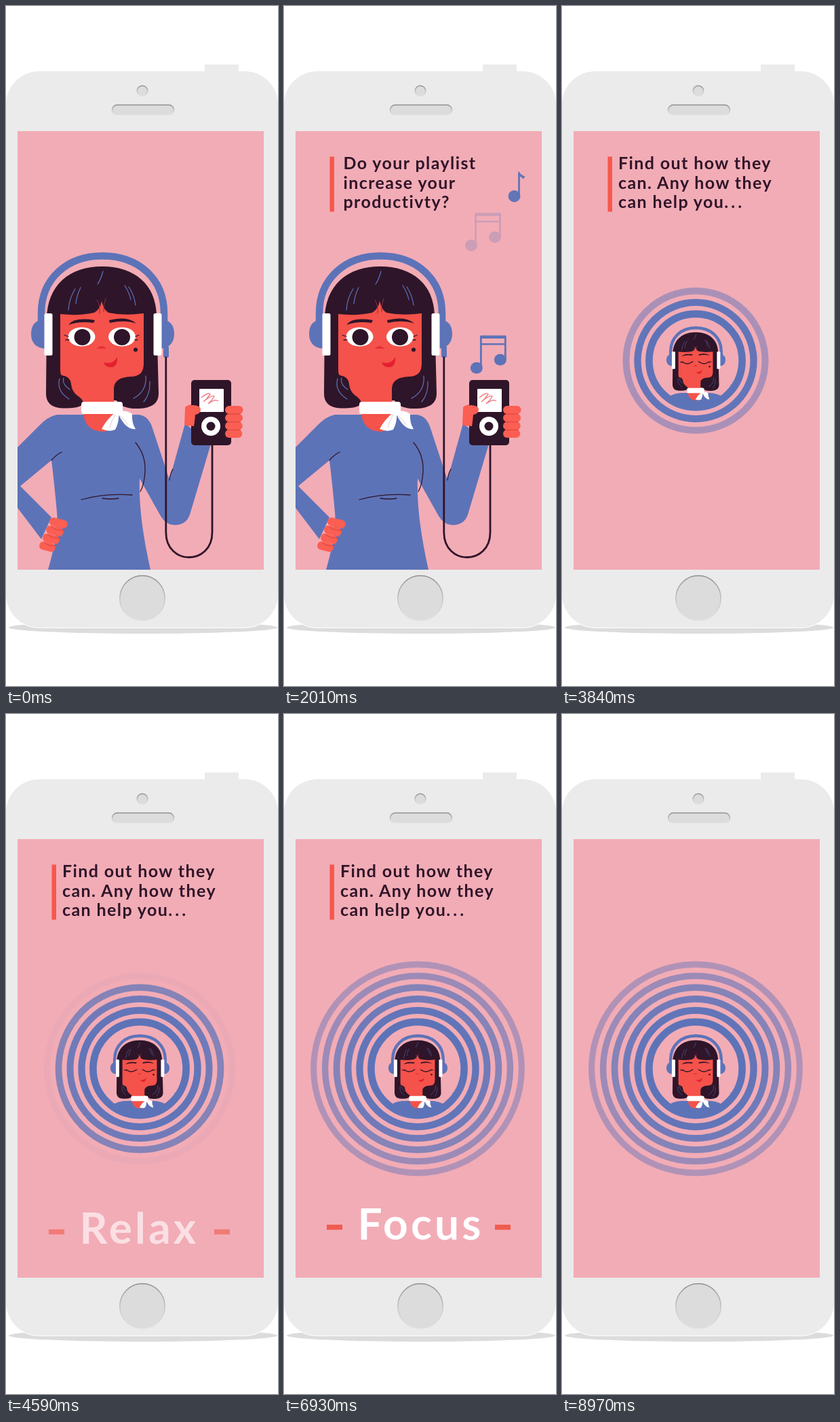
Write an HTML page that moves like this. It is 401 px wide and 1000 px high and loops after 9 s.

```html
<!DOCTYPE html>
<html lang="en">
<head>
<meta charset="utf-8">
<title>Playlist</title>
<style>
html, body { margin: 0; width: 100%; height: 100%; overflow: hidden; background: #fff; }
svg { display: block; width: 100%; height: 100%; }
text { font-family: Lato, "Open Sans", sans-serif; font-weight: 700; }
.copy { font-size: 25px; letter-spacing: 1.4px; fill: #2f1529; }
.dots { letter-spacing: 4px; }
.word { font-size: 64px; letter-spacing: 4.2px; fill: #fff; }
.blue { fill: #5d73b8; }
.dark { fill: #2f1529; }
.skin { fill: #f4524a; }
.hand { fill: #fb5e53; }
.white { fill: #fff; }
.line { fill: none; stroke: #2f1529; stroke-linecap: round; }
.strand { fill: none; stroke: #5d73b8; stroke-width: 1.2; stroke-linecap: round; }
.band { fill: none; stroke: #5d73b8; }
</style>
</head>
<body>
<svg id="stage" viewBox="0 0 401 1000"></svg>
<script>
const LOOP = 9000;
const stage = document.getElementById('stage');

const clamp = v => Math.max(0, Math.min(1, v));
const ramp = (t, a, b) => clamp((t - a) / (b - a));
const easeOut = p => 1 - (1 - p) ** 3;
const easeInOut = p => p < .5 ? 2 * p * p : 1 - 2 * (1 - p) ** 2;

const path = (d, cls, extra = '') => `<path d="${d}" class="${cls}" ${extra}/>`;
const line = (d, w = 1.3) => path(d, 'line', `stroke-width="${w}"`);
const box = (x, y, w, h, r, cls) =>
  `<rect x="${x}" y="${y}" width="${w}" height="${h}" rx="${r}" class="${cls}"/>`;
const dot = (x, y, r, cls, ry = r) =>
  `<ellipse cx="${x}" cy="${y}" rx="${r}" ry="${ry}" class="${cls}"/>`;
const copy = (id, x, lines) => `<g id="${id}"><text class="copy">` +
  lines.map((s, i) => `<tspan x="${x}" y="${240 + i * 28.6}">${s}</tspan>`).join('') + '</text></g>';

const defs = `<defs>
  <filter id="rough" x="-5%" y="-5%" width="110%" height="110%" color-interpolation-filters="sRGB">
    <feTurbulence type="fractalNoise" baseFrequency=".25" numOctaves="2" seed="4"/>
    <feDisplacementMap in="SourceGraphic" scale="1.4" xChannelSelector="R" yChannelSelector="G"/>
  </filter>
  <linearGradient id="rim" x1="0" y1="0" x2="0" y2="1">
    <stop offset="0" stop-color="#8f8f8f"/><stop offset=".55" stop-color="#c9c9c9"/>
    <stop offset="1" stop-color="#e6e6e6"/>
  </linearGradient>
  <clipPath id="screen"><rect x="17" y="184" width="363" height="645"/></clipPath>
  <clipPath id="disc"><circle cx="197" cy="521.5" r="66"/></clipPath>
</defs>`;

const phone = `
  <ellipse cx="202" cy="914" rx="198" ry="9" fill="#dcdcdc"/>
  <rect x="0" y="97" width="401" height="818" rx="49" fill="#fff"/>
  <rect x="293" y="86" width="50" height="20" fill="#ebebeb"/>
  <rect x="0" y="96" width="401" height="818" rx="49" fill="#ebebeb"/>
  <g fill="#dcdcdc" stroke="url(#rim)" stroke-width="1.6">
    <circle cx="201" cy="125" r="7.8"/>
    <rect x="156.5" y="145.5" width="91" height="15" rx="7.5"/>
    <circle cx="201" cy="871" r="33.2"/>
  </g>
  <rect x="17" y="184" width="363" height="645" fill="#f2acb6"/>`;

const openEyes =
  dot(111.5, 486.5, 20, 'white', 14) + dot(171, 486.5, 20, 'white', 14) +
  dot(112.5, 487, 12, 'dark') + dot(171, 487, 12, 'dark') +
  line('M92 486L86 484M93 491L88 491M191 486L196 484M190 491L194 491');

const closedEyes =
  line('M93 488Q111 502 131 488M152 488Q171 502 190 488', 3.4) +
  line('M94 491L86 489M190 491L197 488', 2.4);

const head = eyes => `
  <g filter="url(#rough)">
    ${path('M52 470V452C52 401 90 367.5 142 367.5C195 367.5 233 401 233 452V470', 'band', 'stroke-width="10.5"')}
    ${path('M58 460Q37 462 37 482Q37 502 58 504Z', 'blue')}
    ${path('M227 460Q248 462 248 482Q248 502 227 504Z', 'blue')}
    ${path(`M142 383C94 383 60 410 60 462L59 570Q59 588 78 591Q113 594 117 580H163Q170 593 196 592
      Q225 591 225 570L222 455C221 410 190 383 142 383Z`, 'dark')}
  </g>
  ${path(`M80 453Q108 456 130 451Q139 446 141 434Q144 447 151 451Q174 456 203 452V526Q203 545 184 545
    Q160 546 159 562V590H114Q117 580 104 572Q97 566 96 556Q95 545 82 543Q80 542 80 534Z`, 'skin')}
  ${path('M114 598Q116 625 143 626Q160 624 162 598Z', 'skin')}
  ${eyes}
  ${path('M92 469Q100 457 131 462L129 466Q108 463 92 469ZM152 462Q180 455 192 467Q176 461 153 466Z', 'dark')}
  ${path('M134 504Q141 496 148 504Z', '', 'fill="#e8303a"')}
  ${path('M144 524Q158 528 164 516Q165 533 152 531Q146 530 144 524Z', '', 'fill="#e5202f"')}
  ${dot(191, 505.5, 3, 'dark')}
  ${path(`M102 416Q93 430 92 447M110 414Q104 426 103 438M181 413Q189 425 191 440M175 411Q182 422 184 432
    M135 409Q140 402 143 390M79 548Q74 566 93 578M85 547Q82 556 94 564M206 544Q208 566 188 577
    M212 552Q213 570 203 582`, 'strand')}
  ${path('M134 432Q139 440 138 452M147 430Q143 440 144 450', '', 'fill="none" stroke="#8c2f3c"')}
  <g filter="url(#rough)">${box(56.5, 452, 12, 62, 2.5, 'white')}${box(217.5, 452, 12, 62, 2.5, 'white')}</g>`;

const scarf =
  box(111, 582, 61, 18, 4, 'white') +
  path('M163 596Q148 608 141 622Q152 627 161 623Q167 612 166 600Z', 'white') +
  path('M160 598Q176 592 186 600Q185 613 191 622Q178 624 167 603Z', 'white') +
  path('M161 601Q155 610 153 620M167 602Q176 608 180 616', '', 'fill="none" stroke="#e6c9d2"');

const fingers = [0, 1, 2, 3].map(i =>
  `<g transform="rotate(14 ${77 - i * 5} ${760 + i * 11.7})">${box(64 - i * 5, 754 + i * 11.7, 27 - i, 12.4, 6, 'hand')}</g>` +
  box(323, 588 + i * 11.7, 26.5 - i * .4, 12, 6, 'hand')).join('') +
  path('M67 766Q74 772 87 771M61 777Q69 784 82 782M56 789Q63 795 77 794M326 600H346M326 611.7H346M326 623.4H346',
    '', 'fill="none" stroke="#d8433f"');

const body =
  path(`M75 601H195Q210 602 216 621L241 697L264 614L302 644L271 748Q265 765 246 763Q235 762 228 750L197 695
    Q195 750 213 829H62Q78 774 75 744Q71 700 67 668L21 706L67 752L52 784L17 738V649L47 619Q62 603 75 601Z`, 'blue') +
  line('M67 668Q74 660 82 656M191 642Q206 660 205 684Q204 704 198 714M111 726Q145 716 186 719M142 724Q155 726 166 724M241 697Q242 688 246 681');

const player =
  path('M264 590Q272 583 284 588V618L264 617Z', 'hand') +
  box(273, 550, 59, 96, 5, 'dark') +
  box(285, 563, 36, 34, 1, 'white') +
  path('M288 576Q299 567 301 571Q296 578 291 582Q304 571 307 574Q304 580 298 585Q308 577 313 581', '',
    'fill="none" stroke="#f2808a" stroke-width="1.5"') +
  dot(302, 618, 14, 'white') + dot(302, 618, 6.5, 'dark') +
  path('M264 592Q266 587 276 587Q288 588 287 594Q286 600 279 601Q278 612 277 618L263 616Z', 'hand');

const woman = `<g id="woman">
  ${body}${head(openEyes)}${scarf}
  ${box(232, 500, 8, 17, 2, 'blue')}
  ${line('M235.8 517V774C235.8 823 304 823 304 774V646', 2.8)}
  ${player}${fingers}
</g>`;

const portrait = `<g id="portrait">
  <g clip-path="url(#disc)">${path('M140 600Q150 570 176 569H218Q244 570 255 600Z', 'blue')}</g>
  <g transform="translate(138.6 321.5) scale(.413)">${head(closedEyes)}${scarf}</g>
</g>`;

const ringLook = [1, .97, .86, .73, .58, .44];
const ringStart = [2760, 3220, 3690, 4140, 4570, 5130];
const rings = '<g filter="url(#rough)">' + ringLook.map((_, i) =>
  `<circle id="ring${i}" cx="197" cy="521.5" r="${68.6 + 16.95 * i}" class="band" stroke-width="${10.6 - .3 * i}"/>`
).join('') + '</g>';

const pair = dot(9, 48, 9, 'blue', 8.5) + dot(44, 36, 9, 'blue', 8.5) +
  path('M15.5 48V1M51.5 36V1', 'band', 'stroke-width="2.8"') +
  path('M15 2.5H52', 'band', 'stroke-width="4.5"') + path('M15 13H51', 'band', 'stroke-width="2.5"');
const single = dot(9, 38, 9, 'blue', 8.7) + path('M16 38V3', 'band', 'stroke-width="2.8"') +
  path('M15 0Q17 6 25 9L22 13Q20 9 16 9Z', 'blue');

const notes = [
  { art: pair, start: 900, span: 1000, from: [277, 486], to: [267, 304], out: [1790, 2085] },
  { art: single, start: 1230, span: 930, from: [321, 495], to: [331, 228], out: [2000, 2320] },
  { art: pair, start: 1920, span: 900, from: [275, 488], to: [267, 304], out: [2600, 2800] },
  { art: single, start: 2250, span: 930, from: [321, 495], to: [331, 228], out: [2620, 2850] }
];

const words = [
  { text: 'Relax', dash: 307, in: [4500, 4830], out: [5580, 5790] },
  { text: 'Focus', dash: 311, in: [5790, 6000], out: [6930, 7140] },
  { text: 'Sleep', dash: 298, in: [7140, 7350], out: [8280, 8670] }
];
const dash = x => `<rect x="${x}" y="751" width="23" height="7.5" fill="#f15c50"/>`;

stage.innerHTML = defs + phone + `<g clip-path="url(#screen)">
  ${woman}${rings}${portrait}
  ${notes.map((n, i) => `<g id="note${i}">${n.art}</g>`).join('')}
  <g filter="url(#rough)"><rect id="bar" x="67.5" y="221.5" width="6.5" height="81" fill="#f7574c"/></g>
  ${copy('ask', 87.5, ['Do your playlist', 'increase your', 'productivty?'])}
  ${copy('answer', 83, ['Find out how they', 'can. Any how they', 'can help you<tspan class="dots">...</tspan>'])}
  ${words.map((w, i) => `<g id="word${i}"><g filter="url(#rough)">${dash(63)}${dash(w.dash)}
    <text class="word" x="108.5" y="772.5">${w.text}</text></g></g>`).join('')}
</g>`;

const parts = {};
stage.querySelectorAll('g[id], circle[id], rect[id]').forEach(el => parts[el.id] = el);

function show(id, alpha, x = 0, y = 0) {
  const el = parts[id];
  el.setAttribute('display', alpha > .002 ? 'inline' : 'none');
  el.setAttribute('opacity', alpha.toFixed(3));
  el.setAttribute('transform', `translate(${x.toFixed(2)} ${y.toFixed(2)})`);
}

function draw(t) {
  const end = 1 - ramp(t, 8850, 8960);

  show('bar', t > 20 ? end : 0);
  parts.bar.setAttribute('height', 81 * easeOut(ramp(t, 20, 330)));

  const askIn = easeOut(ramp(t, 210, 660));
  show('ask', askIn * (1 - ramp(t, 3030, 3300)), -10 * (1 - askIn));
  const answerIn = easeOut(ramp(t, 3330, 3840));
  show('answer', answerIn * end, -8 * (1 - answerIn));

  notes.forEach((n, i) => {
    const p = easeInOut(ramp(t, n.start, n.start + n.span));
    const alpha = ramp(t, n.start - 30, n.start + 80) * (1 - ramp(t, ...n.out));
    const [x, y] = n.from.map((a, k) => a + (n.to[k] - a) * p);
    show('note' + i, alpha, x, y);
  });

  show('woman', 1 - ramp(t, 2750, 3600));
  show('portrait', ramp(t, 2750, 3600));
  ringLook.forEach((look, i) => {
    const span = i ? 270 : 800;
    show('ring' + i, look * ramp(t, ringStart[i], ringStart[i] + span));
  });

  words.forEach((w, i) => {
    const a = easeOut(ramp(t, ...w.in)) * (1 - easeInOut(ramp(t, ...w.out)));
    show('word' + i, a, 0, 18 * (1 - a));
  });
}

const begin = performance.now();
function tick() {
  draw((performance.now() - begin) % LOOP);
  requestAnimationFrame(tick);
}
draw(0);
requestAnimationFrame(tick);
</script>
</body>
</html>
```
